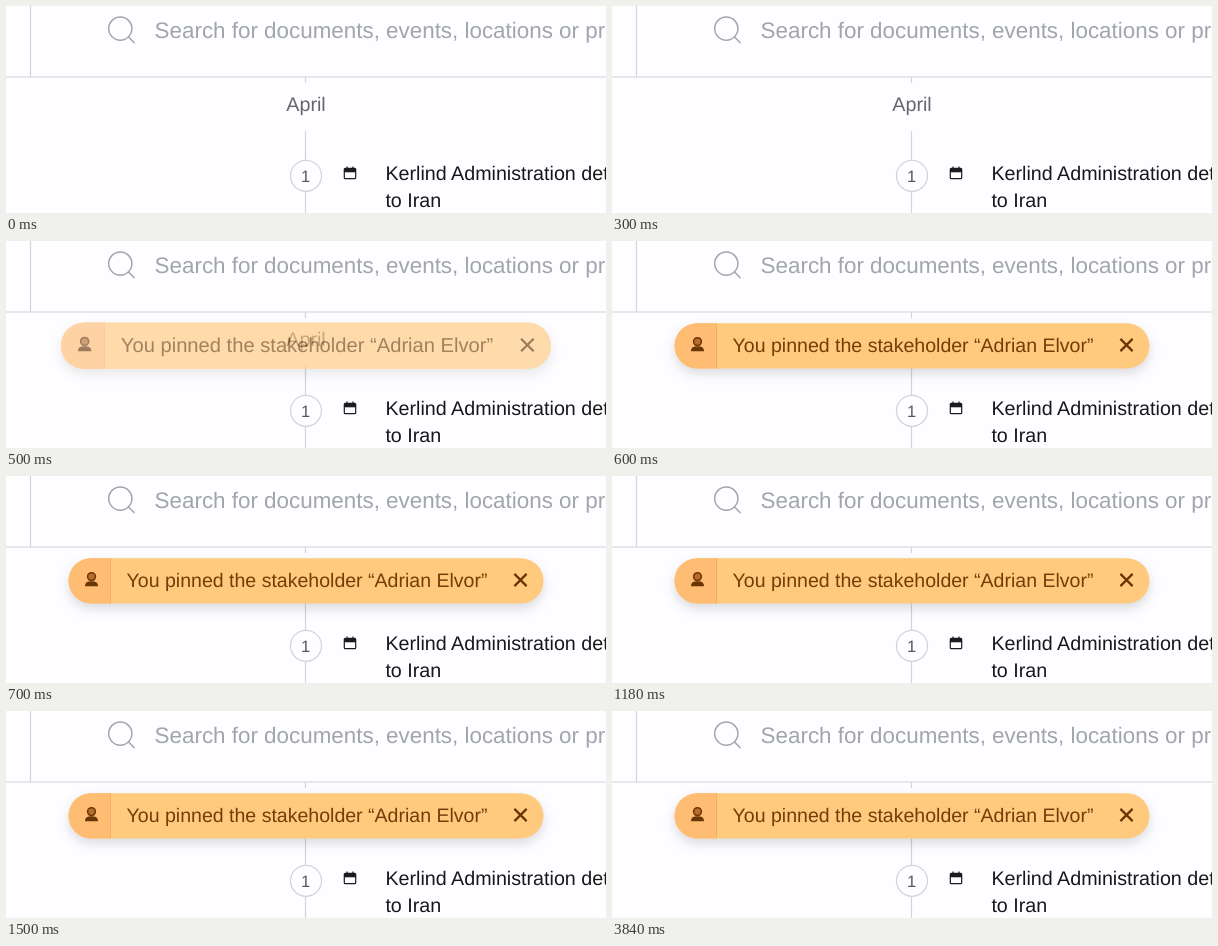
An HTML page that plays this animation: 600x207 px, repeating every 5400 ms.

```html
<!DOCTYPE html>
<html lang="en">
<head>
<meta charset="utf-8">
<title>Pinned stakeholder notice</title>
<style>
  html, body { margin: 0; width: 100%; height: 100%; overflow: hidden; background: #fefdff; }
  svg { display: block; width: 600px; height: 207px; }
  text { font: 19.7px "Liberation Sans", Arial, sans-serif; text-rendering: geometricPrecision; }
  .rule { stroke: #d0d4db; stroke-width: 1.2; fill: none; }
  .hint { font-size: 22.4px; fill: #a1a6ad; }
  .lens { stroke: #a1a6ad; stroke-width: 1.5; fill: none; stroke-linecap: round; }
  .month { fill: #65676b; text-anchor: middle; }
  .day { font-size: 16.5px; fill: #55575b; text-anchor: middle; }
  .title { fill: #17181a; }
  .toast { transform-origin: 300px 104.8px; opacity: 0; }
  .pill { fill: #ffca7d; filter: drop-shadow(0 5px 6px rgba(40, 40, 60, .17)); }
  .toast text { font-size: 19.55px; fill: #743d08; }
  .cross { stroke: #683305; stroke-width: 2.2; fill: none; }
</style>
</head>
<body>
<svg viewBox="0 0 600 207">
  <path class="rule" d="M0 71H600M24.5 0V71M299.5 71V77M299.5 125V154M299.5 186V207"/>

  <g class="lens">
    <circle cx="114.3" cy="22.6" r="11.6"/>
    <path d="M122.6 31L128 36.6"/>
  </g>
  <text class="hint" x="148.6" y="32.4">Search for documents, events, locations or projects</text>

  <text class="month" x="300" y="105">April</text>
  <circle class="rule" cx="300" cy="169.8" r="15.5"/>
  <text class="day" x="299.6" y="175.6">1</text>

  <g fill="none" stroke="#1b1c1e" stroke-width="1.2">
    <rect x="338.3" y="162.3" width="11.4" height="10.4" rx="1"/>
    <path d="M338 164.6H350" stroke-width="3.4"/>
    <path d="M341 160.6V163M347 160.6V163"/>
  </g>
  <text class="title" x="379.4" y="174.3">Kerlind Administration details</text>
  <text class="title" x="379.4" y="200.5">to Iran</text>

  <g class="toast" id="toast">
    <rect class="pill" x="62.5" y="82.2" width="475" height="45.2" rx="22.6"/>
    <path d="M104.5 82.2H85.1a22.6 22.6 0 0 0 0 45.2H104.5Z" fill="#ffbc73"/>
    <path d="M104.5 82.2V127.4" stroke="#eeb069"/>
    <g stroke="#6b3606" stroke-width="1.5">
      <circle cx="85.5" cy="100.6" r="3.9" fill="#b66d2c"/>
      <path d="M79.8 109.4C79.8 106.6 82 105.9 85.5 105.9S91.2 106.6 91.2 109.4Z" fill="#6b3606"/>
    </g>
    <text x="120.6" y="110.6">You pinned the stakeholder “Adrian Elvor”</text>
    <path class="cross" d="M508.4 97.9L520.6 110.1M520.6 97.9L508.4 110.1"/>
  </g>
</svg>
<script>
  const LOOP = 5400;
  // time in ms, opacity, scale; each pose holds until the next
  const poses = [
    [0, 0, 1.032],
    [500, 0.65, 1.032],
    [600, 1, 1],
    [LOOP, 1, 1]
  ];
  const keys = poses.map(([time, opacity, scale]) => ({
    offset: time / LOOP,
    opacity,
    transform: `scale(${scale})`,
    easing: "steps(1, end)"
  }));
  document.getElementById("toast").animate(keys, { duration: LOOP, iterations: Infinity });
</script>
</body>
</html>
```
